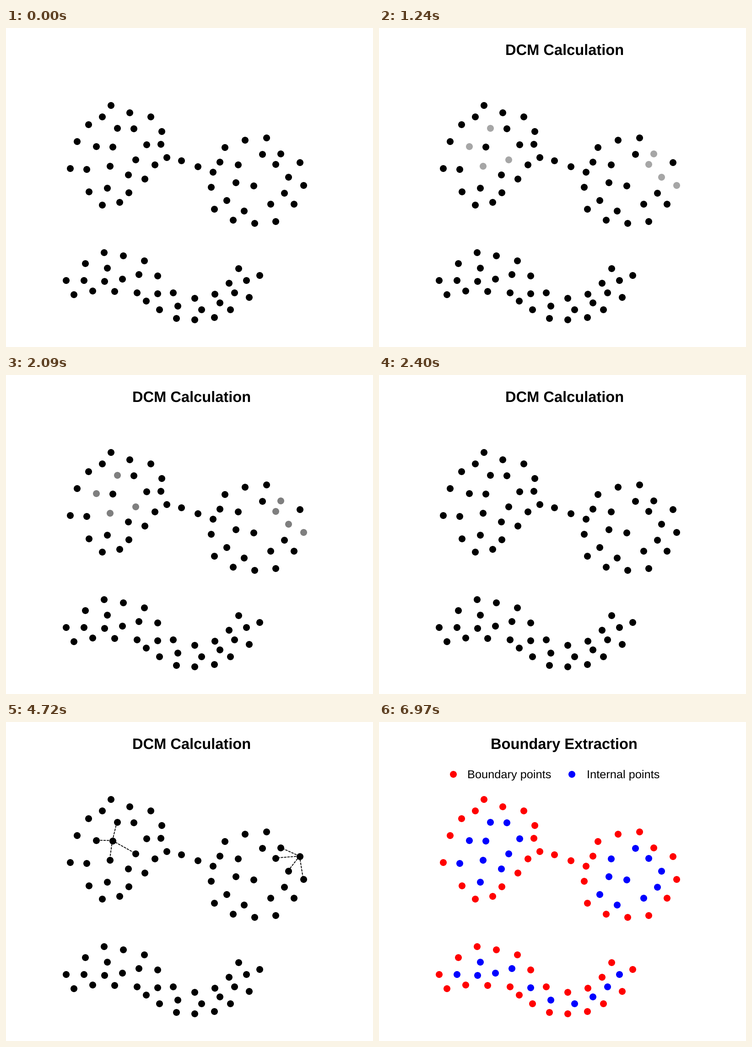
A matplotlib script for the animation above (8000 ms loop, 802x698 px).

```python
import matplotlib.pyplot as plt
import numpy as np
from matplotlib.animation import FuncAnimation
from matplotlib.collections import LineCollection

W, H, DPI = 802, 698, 64
PT = 72 / DPI            # points per pixel
LOOP, INTERVAL = 8000, 20
STEP = 77.3              # ms between picture changes
BLACK, RED, BLUE = (0, 0, 0), (1, 0, 0), (0, 0, 1)

plt.rcParams["font.family"] = "Liberation Sans"
plt.rcParams["text.hinting"] = "no_hinting"

left_rim = [
    (228, 168), (269, 184), (315, 193), (339, 225), (337, 253), (350, 282),
    (382, 289), (418, 302), (324, 298), (302, 329), (267, 359), (247, 380),
    (209, 386), (180, 357), (139, 306), (154, 247), (179, 210), (209, 193),
]
left_core = [
    (278, 219), (306, 254), (175, 308), (266, 320), (220, 349),
]
right_rim = [
    (521, 244), (568, 239), (477, 260), (466, 292), (451, 314), (447, 347),
    (454, 395), (495, 419), (542, 426), (588, 422), (628, 384),
]
right_core = [
    (559, 275), (506, 298), (501, 337), (540, 344), (607, 360), (577, 384),
    (519, 399), (481, 376),
]
wave_rim = [
    (130, 551), (147, 582), (172, 514), (213, 490), (255, 497), (301, 508),
    (330, 541), (364, 578), (411, 590), (455, 581), (486, 557), (507, 525),
    (553, 540), (530, 588), (489, 615), (454, 632), (411, 637), (371, 634),
    (334, 615), (305, 596), (285, 578), (236, 575), (188, 574),
]
wave_core = [
    (169, 551), (220, 524), (214, 553), (253, 548), (289, 538), (330, 580),
    (374, 607), (426, 615), (466, 600), (498, 578), (524, 551),
]
inner, outer = (232, 259), (641, 293)
inner_near = [(242, 218), (196, 258), (282, 287), (226, 301)]
outer_near = [(599, 274), (588, 297), (616, 325), (649, 343)]

fig = plt.figure(figsize=(W / DPI, H / DPI), dpi=DPI, facecolor="white")
ax = fig.add_axes([0, 0, 1, 1])
ax.set_xlim(0, W)
ax.set_ylim(H, 0)
ax.axis("off")


def dots(points, color=BLACK):
    x, y = np.array(points).T + 0.5
    return ax.scatter(x, y, s=(15 * PT) ** 2, color=[color], linewidths=0, zorder=3)


def label(x, y, text, size, weight="normal"):
    return ax.text(x, y, text, fontsize=size * PT, weight=weight,
                   ha="left", va="baseline", color="black")


rim = dots(left_rim + right_rim + wave_rim)
core = dots(left_core + right_core + wave_core)
inner_dot, outer_dot = dots([inner]), dots([outer])
inner_ring, outer_ring = dots(inner_near), dots(outer_near[1:3])
outer_edge = dots([outer_near[0], outer_near[3]])

spokes = [(inner, p) for p in inner_near] + [(outer, p) for p in outer_near]
links = LineCollection(np.array(spokes) + 0.5, colors="black", linewidths=1.8 * PT,
                       linestyles=[(0, (2.9, 1.1))], zorder=2)
ax.add_collection(links)

calc_title = label(275.6, 59.6, "DCM Calculation", 32.6, "bold")
extract_title = label(243.8, 59.6, "Boundary Extraction", 32.6, "bold")
legend = [
    dots([(161, 113)], RED), label(193.1, 122.4, "Boundary points", 25.4),
    dots([(420, 113)], BLUE), label(453.6, 122.4, "Internal points", 25.4),
]


def blink(t):
    """Three fades to white and back."""
    start, period = 909, 491
    phase = (t - start) / period
    if not 0 <= phase < 3:
        return 0
    return 1 - abs(2 * (phase % 1) - 1)


def draw(i):
    k = int((i * INTERVAL + 4) / STEP)
    extracting, done = k >= 73, k >= 90

    calc_title.set_visible(12 <= k < 73)
    extract_title.set_visible(extracting)
    for part in legend:
        part.set_visible(extracting)

    links.set_visible(41 <= k < 73)
    links.set_alpha(float(np.clip((k - 40) / 7, 0, 1)))

    grey = (blink(k * STEP + 3),) * 3
    rim.set_color(RED if done else BLACK)
    core.set_color(BLUE if done else BLACK)
    inner_dot.set_color(BLUE if extracting else BLACK)
    outer_dot.set_color(RED if extracting else BLACK)
    for ring in (inner_ring, outer_ring):
        ring.set_color(BLUE if done else grey)
    outer_edge.set_color(RED if done else grey)
    return []


anim = FuncAnimation(fig, draw, frames=LOOP // INTERVAL, interval=INTERVAL,
                     init_func=lambda: draw(0), repeat=True, repeat_delay=0)
plt.show()
```
